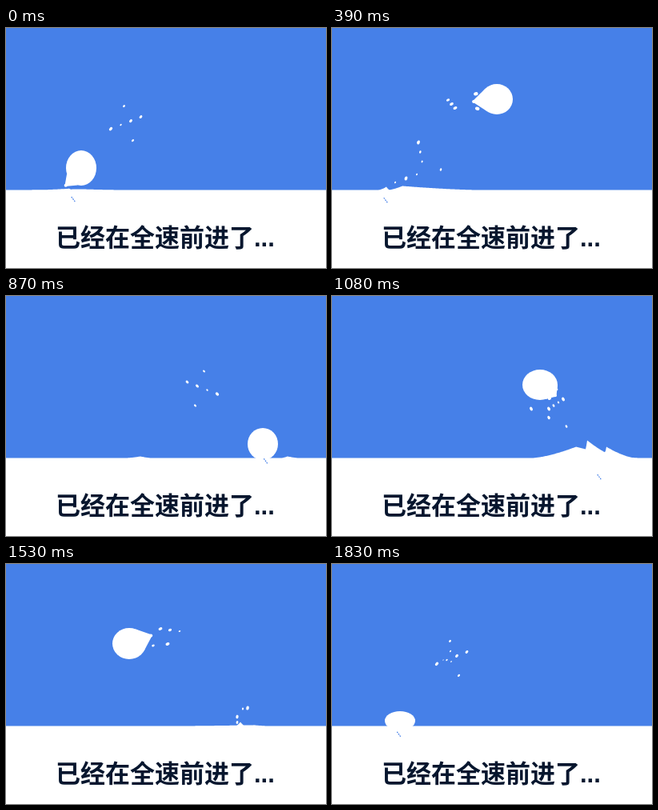
An HTML page with a canvas for the animation above (1.86 s loop, 400 px wide and 300 px high).

```html
<!DOCTYPE html>
<html lang="zh">
<head>
<meta charset="utf-8">
<style>
html, body { margin: 0; width: 100%; height: 100%; overflow: hidden; background: #fff; }
canvas { position: absolute; left: 0; top: 0; width: 400px; height: 300px; }
p {
  position: absolute; left: 62px; top: 241px; margin: 0;
  font: bold 31px/44px "Liberation Sans", "Noto Sans CJK SC", "Noto Sans CJK", sans-serif;
  color: #07162e; white-space: nowrap;
}
</style>
</head>
<body>
<canvas id="c" width="400" height="300"></canvas>
<p>已经在全速前进了...</p>
<script>
const ctx = document.getElementById('c').getContext('2d');
const BLUE = '#4680e8', LOOP = 1860, TURN = 960, STEP = 30, SEA = 202.5;
const BALL_AXIS = 401, SEA_AXIS = 398;

// Key points of one hop: phase, x, y, rx, ry
const hop = [
  [0, 94, 175, 19, 22], [120, 141, 111, 22, 19], [390, 206, 89, 20, 19],
  [540, 232, 90, 20, 19], [630, 247, 99.5, 21, 19.5], [870, 321, 185, 19, 20],
  [930, 316, 196, 19, 12], [960, 308, 175, 19, 22]
];

// Crests: centre, height, left width, right width, start, peak, end
const waves = [
  [93, 14, 80, 55, -10, 120, 330],
  [79, 22, 42, 5, -10, 120, 300],
  [55, 14, 36, 4, 20, 120, 260],
  [88, 5, 18, 95, 250, 390, 700],
  [68, 4, 10, 4, 300, 390, 450],
  [168, 2, 18, 14, 780, 870, 930],
  [352, 2, 8, 14, 840, 870, 930]
];

// A burst is rows of drops that drift together while it lasts
const row = (x, y, dx, dy, n) =>
  Array.from({ length: n }, (_, i) => [x + i * dx, y + i * dy]);
const bursts = [
  { at: 120, from: 40, to: 270, axis: 404, vx: .06, vy: -.12, rot: -1.1,
    drops: [...row(115, 129, 6, 4, 4), ...row(155, 141, -22, 11, 3)] },
  { at: 390, from: 260, to: 520, axis: 404, vx: .1, vy: .02, rot: -.5,
    drops: row(145, 90, 4.5, 5, 3) },
  { at: 390, from: 240, to: 510, axis: 398, vx: .01, vy: .1, rot: -1.2,
    drops: [...row(108, 143, 2.3, 12, 3), ...row(79, 193, 13.5, -5, 3), [136, 177]] },
  { at: 630, from: 510, to: 760, axis: 404, vx: .13, vy: .06, rot: .4,
    drops: [...row(187, 84, 12, -1.5, 3), ...row(202, 100, 18, 2, 2)] },
  { at: 630, from: 540, to: 730, axis: 398, vx: 0, vy: .08, rot: 1.4,
    drops: [...row(96, 180, 6, 1, 2), ...row(109, 191, 0, 7, 2)] },
  { at: 870, from: 730, to: 1035, axis: 395, vx: 0, vy: .04, rot: .8,
    drops: [...row(226.5, 107.5, 12.5, 5, 4), ...row(247.5, 94, -11, 43, 2)] },
  { at: 930, from: 880, to: 958, axis: 395, vx: 0, vy: .04, rot: .8,
    drops: [...row(256, 120, -10, 2, 2), [247, 109]] }
];

// Rises from 0 to 1 at the peak and falls back
const pulse = (p, from, peak, to) =>
  Math.max(0, Math.min((p - from) / (peak - from), (to - p) / (to - peak)));

// Smooth curve through keys, flat at turning points
function along(keys, p) {
  const n = keys.length - 1;
  let i = 0;
  while (i < n - 1 && keys[i + 1][0] <= p) i++;
  const rate = (j, k) => (keys[j + 1][k] - keys[j][k]) / (keys[j + 1][0] - keys[j][0]);
  const slope = (j, k) => {
    if (j === 0) return rate(0, k);
    if (j === n) return rate(n - 1, k);
    const a = rate(j - 1, k), b = rate(j, k);
    return a * b > 0 ? 2 * a * b / (a + b) : 0;
  };
  const a = keys[i], b = keys[i + 1], h = b[0] - a[0], s = (p - a[0]) / h;
  const s2 = s * s, s3 = s2 * s;
  return a.slice(1).map((v, m) => {
    const k = m + 1;
    return v * (2 * s3 - 3 * s2 + 1) + b[k] * (3 * s2 - 2 * s3) +
      h * (slope(i, k) * (s3 - 2 * s2 + s) + slope(i + 1, k) * (s3 - s2));
  });
}

function oval(x, y, rx, ry, rot = 0) {
  ctx.beginPath();
  ctx.ellipse(x, y, rx, ry, rot, 0, Math.PI * 2);
  ctx.fill();
}

// Run a drawing in mirrored coordinates on the way back
function side(back, axis, draw) {
  ctx.save();
  if (back) ctx.transform(-1, 0, 0, 1, axis, 0);
  draw();
  ctx.restore();
}

function drawBall(p) {
  const [x, y, rx, ry] = along(hop, p);
  oval(x, y, rx, ry);

  // The tail swings round as the path bends, and is drawn in before landing
  const angle = 2.3 + p * .0019;
  const spread = .5 + .35 * Math.min(1, p / 300);
  const len = (31 - 6 * pulse(p, 0, 120, 300)) * Math.min(1, (800 - p) / 160);
  const polar = (a, r, q = r) => [x + r * Math.cos(a), y + q * Math.sin(a)];
  if (len > 18) {
    ctx.beginPath();
    ctx.moveTo(...polar(angle - spread, rx, ry));
    ctx.lineTo(...polar(angle, len));
    ctx.lineTo(...polar(angle + spread, rx, ry));
    ctx.fill();
    oval(...polar(angle, len - 2), 2, 2);
  }
  const blob = Math.min(1, 2 * pulse(p, 40, 260, 500));
  for (const d of [-.35, .35])
    oval(...polar(angle + d, len - 4), 3 * blob, 2.3 * blob, -d);
}

function drawBursts(p, back) {
  for (const b of bursts) {
    if (p <= b.from || p >= b.to) continue;
    const fade = Math.min(1, (p - b.from) / 50, (b.to - p) / 50);
    const d = p - b.at;
    side(back, b.axis, () => {
      b.drops.forEach(([x, y], i) => {
        const r = (1.6 + .5 * Math.sin(i * 2.4 + x)) * fade;
        oval(x + b.vx * d, y + b.vy * d, r * 1.25, r * .85, b.rot);
      });
    });
  }
}

function drawSea(p, back) {
  const spikes = (back ? [105] : [121, 151]).map(x => [x, 5, 6, 6, 590, 630, 670]);
  const list = [...waves, ...spikes];
  const height = x => Math.max(...list.map(([c, h, wl, wr, from, peak, to]) => {
    const near = Math.max(0, 1 - Math.abs(x - c) / (x < c ? wl : wr));
    return h * pulse(p, from, peak, to) * near ** 1.5;
  }));
  ctx.beginPath();
  ctx.moveTo(-10, 300);
  for (let x = -10; x <= 410; x++) ctx.lineTo(x, SEA - height(x));
  ctx.lineTo(410, 300);
  ctx.fill();
}

// Blue flecks under the surface: a dip after launch, a slide at landing
function drawFlecks(p, back) {
  let x, y;
  if (p < 480) {
    x = 67 + 17 * Math.max(0, 1 - p / 120);
    y = 214 + 15 * Math.sin(Math.PI * p / 400);
  } else if (p > 840) {
    const s = (p - 840) / 120;
    x = 328 - 14 * s;
    y = 203 + 13 * s;
  } else return;
  if (back) x = BALL_AXIS - x;
  ctx.fillStyle = BLUE;
  for (const i of [-1, 0, 1]) oval(x + i * 1.7, y + i * 2.3, 1, .7, .8);
}

// Phase of the way back; its climb runs slightly faster
function backPhase(t) {
  if (t < 1080) return t - 960;
  if (t < 1530) return 120 + (t - 1080) * 510 / 450;
  return t - 900;
}

function frame(now) {
  const t = Math.floor(now % LOOP / STEP) * STEP;
  const back = t >= TURN;
  const p = back ? backPhase(t) : t;
  const rest = back ? t : t + 960;

  ctx.fillStyle = BLUE;
  ctx.fillRect(0, 0, 400, 300);
  ctx.fillStyle = '#fff';
  side(back, BALL_AXIS, () => drawBall(p));
  drawBursts(p, back);
  drawBursts(rest, !back);
  side(back, SEA_AXIS, () => drawSea(p, back));
  drawFlecks(p, back);
}

const start = performance.now();
function tick() {
  frame(performance.now() - start);
  requestAnimationFrame(tick);
}
tick();
</script>
</body>
</html>
```
